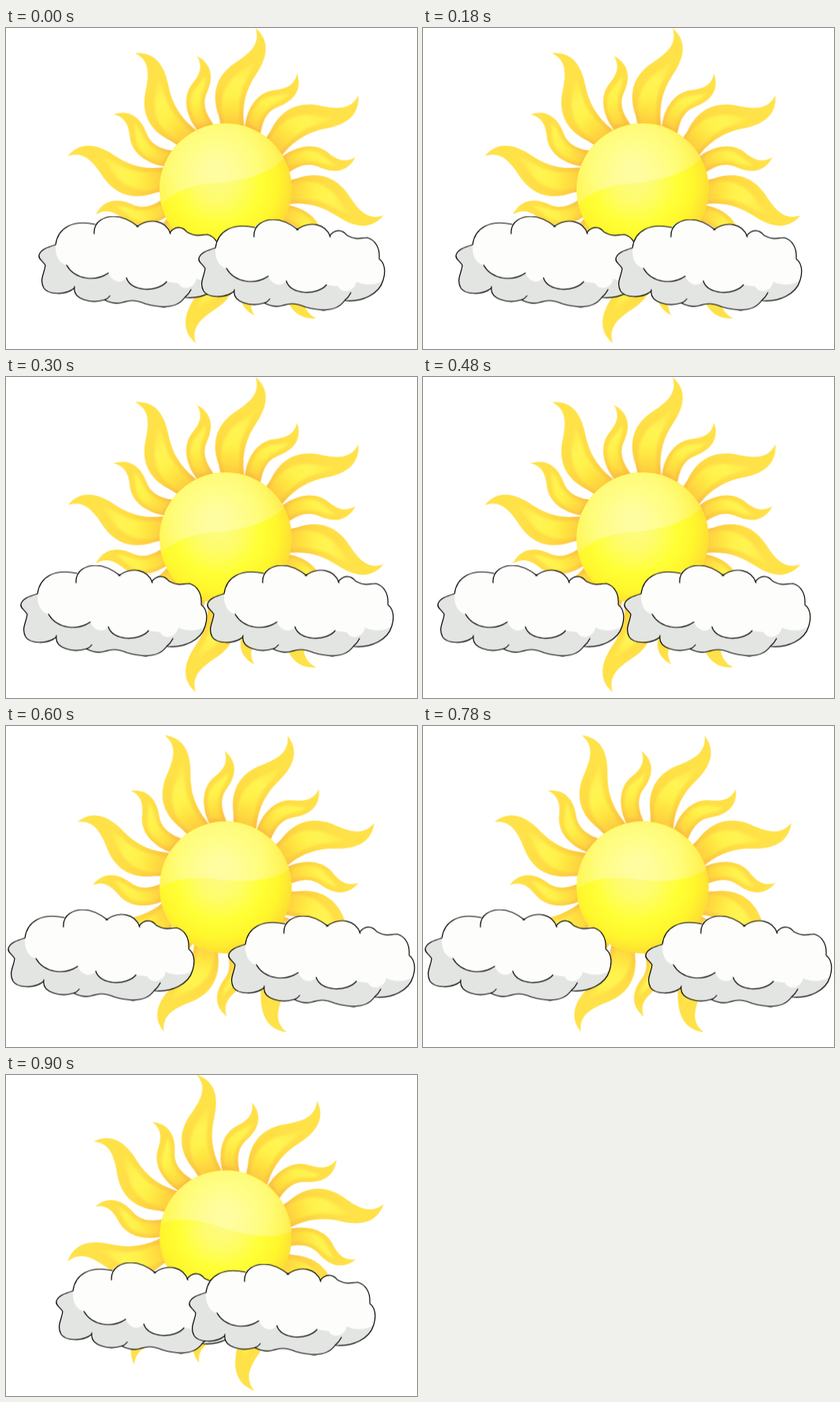
Write an HTML page that moves like this. It is 522 px wide and 408 px high and loops after 1200 ms.

```html
<!DOCTYPE html>
<html lang="en">
<head>
<meta charset="utf-8">
<title>Sun and clouds</title>
<style>
  html, body { margin: 0; width: 100%; height: 100%; overflow: hidden; background: #fff; }
  svg { display: block; width: 522px; height: 408px; }
  #rays { transform-origin: 279px 200.5px; }
  #face { transform-origin: 279px 205px; }
  .line { fill: none; stroke: #000; stroke-width: 1.2; stroke-linecap: round; stroke-linejoin: round; }
</style>
</head>
<body>
<svg viewBox="0 0 522 408">
  <defs>
    <radialGradient id="rim" gradientUnits="userSpaceOnUse" cx="279" cy="202" r="206">
      <stop offset=".39" stop-color="#fbbd45"/>
      <stop offset=".47" stop-color="#fdce41"/>
      <stop offset=".6" stop-color="#ffdc43"/>
      <stop offset=".78" stop-color="#ffe148"/>
    </radialGradient>
    <radialGradient id="core" gradientUnits="userSpaceOnUse" cx="279" cy="202" r="170">
      <stop offset=".47" stop-color="#fdcc3e"/>
      <stop offset=".58" stop-color="#ffe240"/>
      <stop offset=".68" stop-color="#fff24a"/>
      <stop offset=".79" stop-color="#fff452"/>
      <stop offset=".9" stop-color="#ffea4a"/>
      <stop offset="1" stop-color="#ffe148"/>
    </radialGradient>
    <radialGradient id="disc" gradientUnits="userSpaceOnUse" cx="269" cy="196" r="98">
      <stop offset="0" stop-color="#fdfb80"/>
      <stop offset=".25" stop-color="#fefc6c"/>
      <stop offset=".55" stop-color="#ffff36"/>
      <stop offset=".78" stop-color="#fff62c"/>
      <stop offset="1" stop-color="#fdda34"/>
    </radialGradient>
    <radialGradient id="gloss" gradientUnits="userSpaceOnUse" cx="266" cy="174" r="88">
      <stop offset="0" stop-color="#fffeb4" stop-opacity=".75"/>
      <stop offset=".6" stop-color="#fffca0" stop-opacity=".65"/>
      <stop offset="1" stop-color="#fff48a" stop-opacity=".35"/>
    </radialGradient>
    <filter id="soft" x="-20%" y="-20%" width="140%" height="140%">
      <feGaussianBlur stdDeviation="1.6"/>
    </filter>

    <g id="big">
      <path fill="url(#rim)" d="M314,2C319,18 314,29 292,44C268,59 258,82 269,112L274,134H301V122C298,97 304,78 315,61C331,37 332,17 314,2Z"/>
      <path fill="url(#core)" filter="url(#soft)" d="M277,126C267,98 272,74 297,56Q308,48 314,42Q312,52 305,64C294,83 294,98 296,126Z"/>
    </g>
    <g id="small">
      <path fill="url(#rim)" d="M241,38C248,50 246,59 237,71C226,84 225,102 236,122L245,136L265,128L261,121C251,107 249,95 254,84C262,66 261,48 241,38Z"/>
      <path fill="url(#core)" filter="url(#soft)" d="M242,124C230,104 231,88 242,76Q249,68 252,62Q253,70 249,82C244,96 248,109 256,122Z"/>
    </g>

    <g id="cloud">
      <path fill="#e3e5e3" d="M22,36C25,14 44,4 72,10C82,-3 108,-3 126,13C142,1 162,5 168,20C173,12 183,12 189,20C203,27 205,23 215,23C225,26 231,36 230,49C238,56 238,68 235,77C230,95 208,105 186,103C176,117 157,117 136,111C121,105 115,107 108,109C100,112 92,110 84,106C68,111 45,106 46,91C34,101 12,99 7,91C1,80 8,72 9,62C4,55 0,54 1,49C3,42 12,39 22,36Z"/>
      <path fill="#fdfdfb" d="M22,36C25,14 44,4 72,10C82,-3 108,-3 126,13C142,1 162,5 168,20C173,12 183,12 189,20C203,27 205,23 215,23C225,26 231,36 230,49C238,56 238,68 235,77C228,83 214,85 201,79C198,92 183,95 178,85L163,83C151,96 117,97 112,78C106,86 94,84 89,72C72,83 46,80 36,62C26,60 21,49 22,36Z"/>
      <path class="line" d="M22,36C25,14 44,4 72,10M71,22C70,6 84,0 96,0C108,0 118,6 127,13M125,13C142,1 162,5 168,22M167,21C173,12 183,12 189,20C203,27 205,23 215,23C225,26 231,36 230,49M230,50C238,56 238,68 235,77C230,95 208,105 187,103M194,93Q191,99 186,103C176,117 157,117 136,111C121,105 115,107 108,109C100,112 92,110 84,106M91,101Q88,105 84,106C68,111 43,106 46,89M46,91C34,101 12,99 7,91C1,80 8,72 9,62C4,55 0,54 1,49C3,42 12,39 22,36"/>
      <path class="line" d="M36,62C47,81 73,83 89,72M112,78C117,96 151,97 163,83"/>
    </g>
  </defs>

  <g id="rays"></g>
  <g id="face">
    <circle cx="279" cy="205" r="84" fill="url(#disc)"/>
    <path fill="url(#gloss)" d="M197,224C212,209 232,201 258,198C300,195 334,186 353,166A84,84 0 0 0 197,224Z"/>
  </g>
  <use id="left" href="#cloud"/>
  <use id="right" href="#cloud"/>
</svg>
<script>
  const byId = id => document.getElementById(id);

  let rays = '';
  for (let turn = 0; turn < 360; turn += 45) {
    for (const ray of ['small', 'big'])
      rays += `<use href="#${ray}" transform="rotate(${turn} 279 200.5)"/>`;
  }
  byId('rays').innerHTML = rays;

  // Each pose is held for a quarter of the loop.
  function play(id, poses) {
    const frames = poses.map((transform, i) => ({
      transform, offset: i / poses.length, easing: 'steps(1, end)'
    }));
    frames.push({ transform: poses[poses.length - 1], offset: 1 });
    byId(id).animate(frames, { duration: 1200, iterations: Infinity });
  }

  const move = ([x, y]) => `translate(${x}px, ${y}px)`;
  const turns = [0, 0, 12, 24];

  play('rays', turns.map(a => `rotate(${a + 0.7}deg) scale(1.012)`));
  play('face', turns.map(a => `rotate(${a}deg)`));
  play('left', [[41, 239.5], [18, 239.5], [2, 233.5], [63, 238.5]].map(move));
  play('right', [[244, 243.5], [255, 239.5], [282, 241.5], [232, 240.5]].map(move));
</script>
</body>
</html>
```
